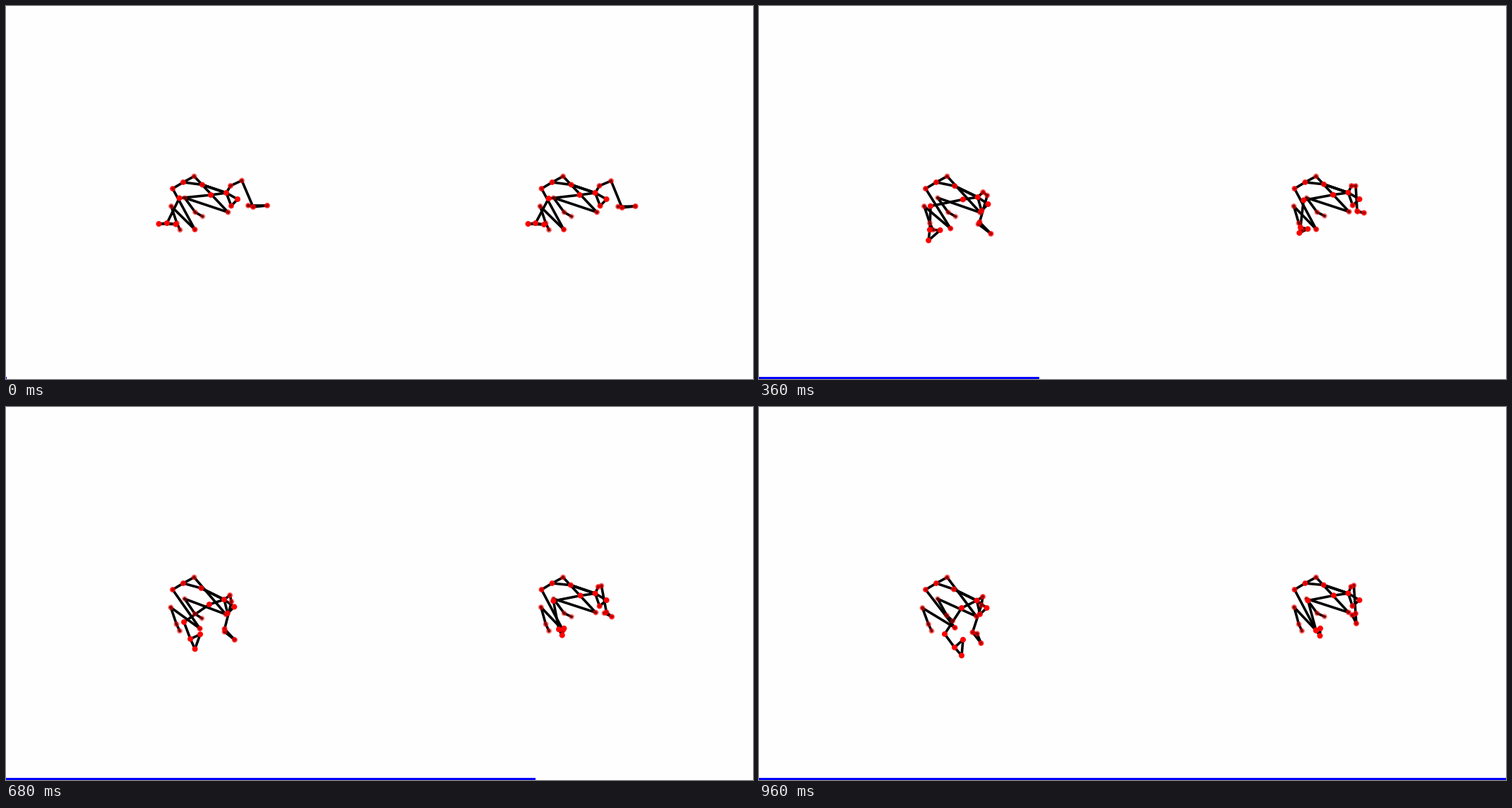
Write a matplotlib script that moves like this. It is 1058 px wide and 529 px high and loops after 1000 ms.

```python
import numpy as np
import matplotlib.pyplot as plt
from matplotlib.animation import FuncAnimation
from matplotlib.collections import LineCollection
from matplotlib.patches import Rectangle

W, H, DPI = 1058, 529, 92
FRAMES, STEP = 25, 40
PX = 72 / DPI
SHIFT = np.array([522.5, 0])

T = np.arange(FRAMES)
LINEAR = T / T[-1]
SINK = LINEAR ** .45   # fast drop, then slow settling
LATE = LINEAR ** 4     # still at first, moves at the end

# Limbs pass through four poses; the first and last moves slow down.
phase = np.interp(T, [0, 5, 14, 24], [0, 1, 2, 3])
pose = np.floor(phase)
CLOCK = np.where(pose == 1, phase, pose + np.sin((phase - pose) * np.pi / 2))

# joint: x, y, opacity
REST = {
    "ankle_r": (253, 272, .3), "ball_r": (268, 292.5, .4), "toe_r": (278.5, 298.5, .35),
    "ankle_l": (234, 284, .5), "ball_l": (242, 308, .45), "toe_l": (246.5, 317.5, .45),
    "hip_r": (266.5, 241.5, .5), "knee_r": (314.5, 292.5, .55),
    "hip_l": (236, 259, .72), "knee_l": (267.5, 317, .75),
    "pelvis": (251, 250, .85), "spine": (278, 253.5, .8),
    "neck": (312, 265, 1), "head": (319, 283.5, .8), "nose": (328, 274, 1),
    "shoulder_l": (290, 268, 1), "shoulder_r": (318, 255, .62),
}
ALPHA = {name: r[2] for name, r in REST.items()}
ALPHA.update(elbow_r=.5, palm_r=.55, wrist_r=.7, finger_r=.72,
             elbow_l=1, wrist_l=1, finger_l=1, thumb_l=1)
ORDER = sorted(ALPHA, key=ALPHA.get)

CHAINS = [
    "pelvis hip_r knee_r ankle_r ball_r toe_r",
    "pelvis hip_l knee_l ankle_l ball_l toe_l",
    "pelvis spine neck head nose neck",
    "spine neck shoulder_l elbow_l wrist_l finger_l thumb_l wrist_l",
    "spine neck shoulder_r elbow_r wrist_r palm_r finger_r wrist_r",
]
BONES = [pair for c in CHAINS for pair in zip(c.split(), c.split()[1:])]


def through(*points):
    """Carry a joint through its key poses."""
    xs, ys = zip(*points)
    keys = range(len(points))
    return np.column_stack([np.interp(CLOCK, keys, xs), np.interp(CLOCK, keys, ys)])


def body(offset, sink, linear, late, **limbs):
    """Resting torso and legs with eased drifts, plus posed arms."""
    joints = {name: np.tile((x, y) + offset, (FRAMES, 1))
              for name, (x, y, _) in REST.items()}
    for ease, moves in (SINK, sink), (LINEAR, linear), (LATE, late):
        for name, move in moves.items():
            joints[name] += np.outer(ease, move)
    for name, points in limbs.items():
        joints[name] = through(*points)
    return joints


left = body(
    0 * SHIFT,
    sink={"neck": (-3.5, 9.5), "nose": (-5.5, 11), "head": (-6, 10.5), "shoulder_r": (-1, 14)},
    linear={"spine": (-2, 5), "shoulder_l": (-3, 17), "knee_l": (10, -4), "knee_r": (-3, 1)},
    late={"knee_r": (-3.5, 3.5), "ball_r": (-2, 3), "toe_r": (-4, 5),
          "ankle_l": (-2.5, 1), "ball_l": (-2, 0), "toe_l": (-2, 0)},
    elbow_l=[(245.5, 272.5), (243, 278), (243, 291), (263, 322)],
    wrist_l=[(228, 308), (237, 316), (248, 319), (277, 341)],
    finger_l=[(216.5, 309), (231, 330), (251.5, 335.5), (287, 352.5)],
    thumb_l=[(240.5, 309.5), (251, 319.5), (263.5, 316), (289, 330)],
    elbow_r=[(334, 247.5), (323.5, 266), (323, 272), (315, 281)],
    wrist_r=[(350, 285), (310, 303), (315.5, 311), (302.5, 319.5)],
    palm_r=[(343, 283), (311, 303.5), (310, 316.5), (309, 321.5)],
    finger_r=[(370, 283), (326, 320.5), (331.5, 326), (314.5, 335)],
)
right = body(
    SHIFT,
    sink={"spine": (-.8, -1), "head": (-1, -1.3), "knee_r": (-2, -1.2),
          "toe_r": (0, -1.2), "ankle_l": (1.5, 0), "knee_l": (-1.3, -.5),
          "shoulder_r": (-2, 0)},
    linear={"shoulder_l": (1.5, -.7), "neck": (0, -.8)},
    late={},
    elbow_l=[(768.5, 273), (769.5, 275.5), (773.5, 275.5), (777.5, 274.5)],
    wrist_l=[(750, 308), (758, 314), (778, 314), (789, 317)],
    finger_l=[(739.5, 309), (752, 321), (782, 323), (794.5, 324.5)],
    thumb_l=[(762, 310), (770, 318), (786.5, 314), (795, 314)],
    elbow_r=[(857, 248), (846, 256), (844, 254), (842.5, 253)],
    wrist_r=[(872.5, 286), (841, 292), (855, 289.5), (845, 293)],
    palm_r=[(867, 284.5), (843, 293), (854, 290), (840, 295)],
    finger_r=[(891.5, 284), (848, 296.5), (868, 289.5), (846, 307)],
)

fig = plt.figure(figsize=(W / DPI, H / DPI), dpi=DPI, facecolor="#fefefe")
ax = fig.add_axes([0, 0, 1, 1])
ax.set(xlim=(0, W), ylim=(H, 0))
ax.axis("off")

bones = LineCollection([], colors="black", linewidths=3.6 * PX, capstyle="projecting", zorder=1)
ax.add_collection(bones)
colors = [(1, 0, 0, ALPHA[name]) for name in ORDER] * 2
dots = ax.scatter(np.zeros(len(colors)), np.zeros(len(colors)), s=(6.2 * PX) ** 2,
                  c=colors, linewidths=1.8 * PX, zorder=2)
bar = ax.add_patch(Rectangle((0, H - 3), 0, 3, color="blue", linewidth=0, zorder=3))


def draw(k):
    bones.set_segments([(s[a][k], s[b][k]) for s in (left, right) for a, b in BONES])
    dots.set_offsets([s[name][k] for s in (left, right) for name in ORDER])
    bar.set_width(W * k / (FRAMES - 1) + .6)
    return bones, dots, bar


anim = FuncAnimation(fig, draw, frames=FRAMES, interval=STEP, repeat=True, repeat_delay=0)
plt.show()
```
